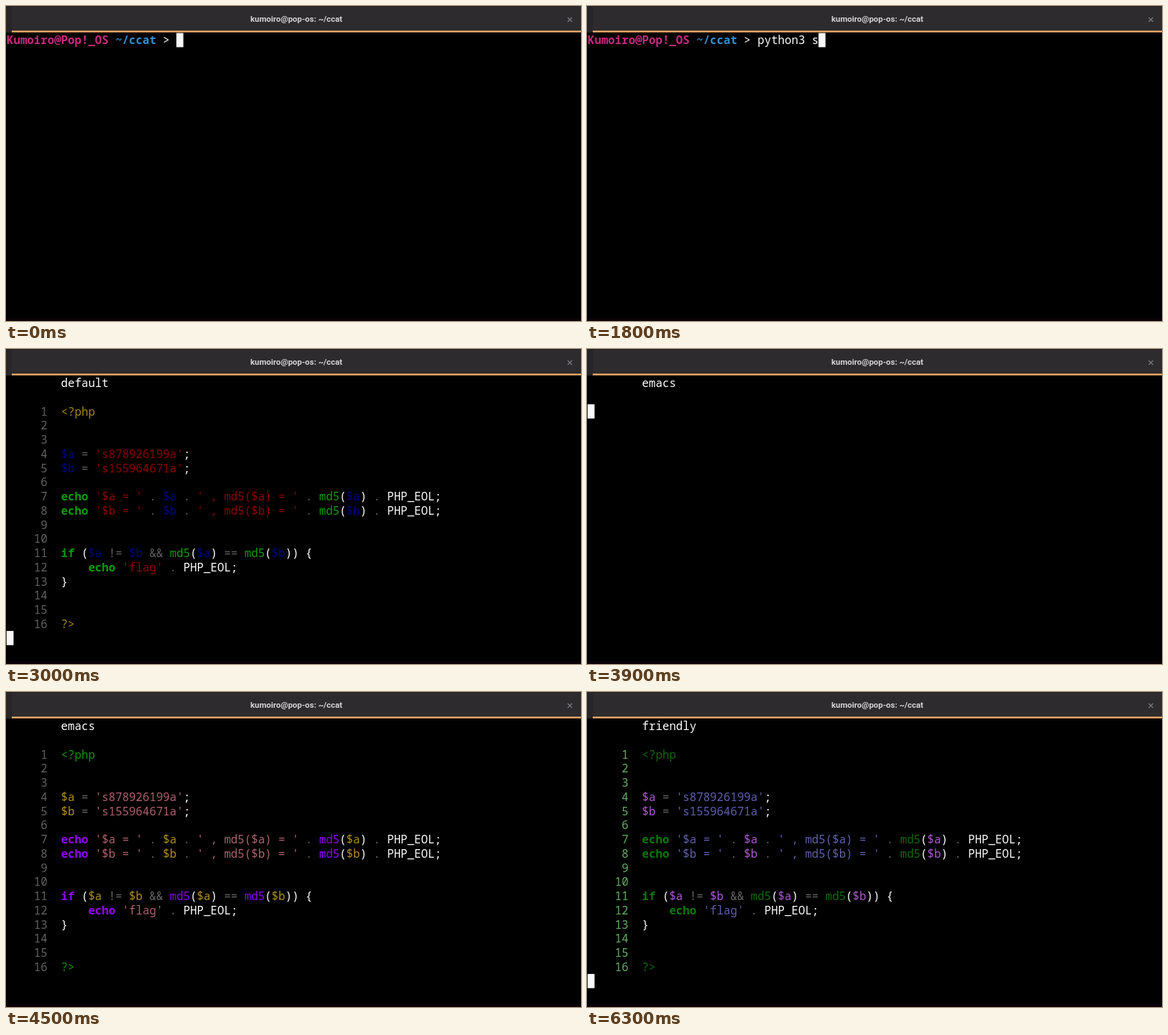
These frames come from a looping animation (800x439 px, 6.4 s). An HTML page with a canvas:

```html
<!DOCTYPE html>
<html lang="en">
<head>
<meta charset="utf-8">
<title>Terminal</title>
<style>
  html, body { margin: 0; height: 100%; overflow: hidden; background: #000; }
  canvas { display: block; }
</style>
</head>
<body>
<canvas width="800" height="439"></canvas>
<script>
const ctx = document.querySelector('canvas').getContext('2d');
const LOOP = 6400, CELL = 9.45, ROW = 19.74;
const MONO = '"Noto Sans Mono", "DejaVu Sans Mono", monospace';

const prompt = [['Kumoiro@Pop!_OS', '#c9287f', true], ['~/ccat', '#2e8fd2', true], ['>', '#fff']];
const command = 'python3 styles.py ';
// [time, number of characters typed]
const typing = [[700, 2], [800, 3], [1000, 4], [1100, 5], [1200, 6], [1300, 7], [1400, 8],
  [1800, 9], [2000, 10], [2100, 11], [2300, 18]];

const code = `<?php


$a = 's878926199a';
$b = 's155964671a';

echo '$a = ' . $a . ' , md5($a) = ' . md5($a) . PHP_EOL;
echo '$b = ' . $b . ' , md5($b) = ' . md5($b) . PHP_EOL;


if ($a != $b && md5($a) == md5($b)) {
    echo 'flag' . PHP_EOL;
}


?>`.split('\n');
const token = /(?<tag><\?php|\?>)|(?<str>'[^']*')|(?<name>\$\w+)|(?<key>echo|if)|(?<fn>md5)|(?<op>!=|&&|==|[.=])|\w+|\S/g;

// pressed: key press that restarts the cursor blink; start: heading; full: whole listing
const themes = [
  { title: 'default', pressed: 2800, start: 2900, full: 3000, num: '#626262', tag: '#a88416',
    str: '#8c0000', name: '#000080', key: '#0c9a0c', fn: '#129a12', op: '#606060' },
  { title: 'emacs', pressed: 3900, start: 3900, full: 4100, num: '#626262', tag: '#109410',
    str: '#af5f6e', name: '#af8f14', key: '#9200f8', fn: '#8a00f0', op: '#666' },
  { title: 'friendly', pressed: 4900, start: 4900, full: 5100, num: '#5faf5f', tag: '#0e6a0e',
    str: '#5f5faf', name: '#af55d7', key: '#087808', fn: '#0e6a0e', op: '#666' }
];

function rect(color, x, y, w, h) {
  ctx.fillStyle = color;
  ctx.fillRect(x, y, w, h);
}

function write(text, col, row, color = '#fff', bold = false) {
  ctx.font = `${bold ? 700 : 400} 15.75px ${MONO}`;
  ctx.textAlign = 'left';
  ctx.fillStyle = color;
  [...text].forEach((ch, i) => ctx.fillText(ch, 1 + (col + i) * CELL, 53.2 + row * ROW));
}

function cursor(col, row) {
  rect('#f8f8f8', 0.8 + col * CELL, 37.6 + row * ROW, 9.7, 19.8);
}

function drawWindow() {
  rect('#000', 0, 0, 800, 439);
  rect('#0a0207', 0, 435, 800, 4);
  rect('#2d2b2e', 0, 0, 800, 36);
  rect('#232124', 0, 0, 800, 1);
  rect('#272528', 0, 1, 8, 36);
  rect('#fab16b', 8, 34.4, 792, 2.3);
  ctx.textAlign = 'center';
  ctx.font = '700 11.4px Roboto, sans-serif';
  ctx.fillStyle = '#d4d3d5';
  ctx.fillText('kumoiro@pop-os: ~/ccat', 404, 22);
  ctx.strokeStyle = '#78767a';
  ctx.lineWidth = 1.4;
  ctx.beginPath();
  ctx.moveTo(781.5, 16); ctx.lineTo(787.5, 22);
  ctx.moveTo(787.5, 16); ctx.lineTo(781.5, 22);
  ctx.stroke();
}

function drawShell(t) {
  let col = 0;
  for (const [text, color, bold] of prompt) {
    write(text, col, 0, color, bold);
    col += text.length + 1;
  }
  const typed = typing.reduce((n, [at, count]) => t >= at ? count : n, 0);
  write(command.slice(0, typed), col, 0);
  if (t >= 2800) cursor(0, 1);
  else if (t < 500 || t >= 700) cursor(col + typed, 0);
}

function drawListing(theme, t) {
  write(theme.title, 8, 0);
  const full = t >= theme.full;
  if (full) code.forEach((line, i) => {
    write(String(i + 1).padStart(6), 0, i + 2, theme.num);
    for (const m of line.matchAll(token)) {
      const kind = Object.keys(m.groups).find(k => m.groups[k]);
      write(m[0], 8 + m.index, i + 2, theme[kind], kind === 'key');
    }
  });
  if ((t - theme.pressed) % 1200 < 600) cursor(0, full ? 18 : 2);
}

function frame(now) {
  const t = now % LOOP;
  drawWindow();
  const theme = themes.findLast(th => t >= th.start);
  if (theme) drawListing(theme, t);
  else drawShell(t);
  requestAnimationFrame(frame);
}
requestAnimationFrame(frame);
</script>
</body>
</html>
```
